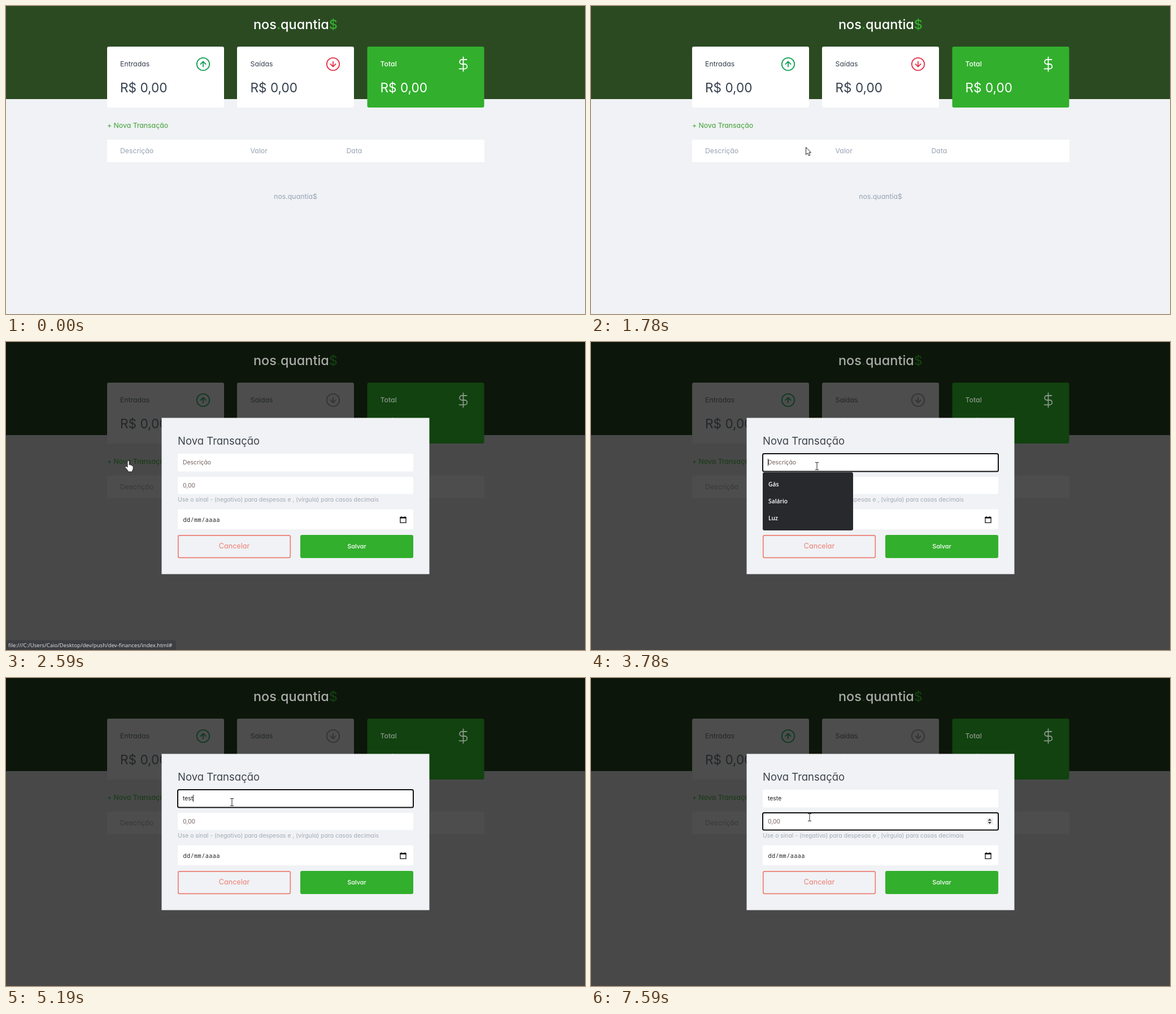
Write an HTML page that moves like this. It is 1025 px wide and 546 px high and loops after 7.99 s.

```html
<!DOCTYPE html>
<html lang="pt-BR">
<head>
<meta charset="utf-8">
<title>Nova Transação</title>
<style>
  html, body { margin: 0; width: 100%; height: 100%; overflow: hidden; background: #f0f2f5; }
  svg { display: block; width: 100%; height: 100%; }

  #stage {
    --page: #f0f2f5; --head: #2b4a22; --card: #fff; --total: #32af2d;
    --logo: #fff; --mark: #35ae2d; --ink: #36414f; --on-total: #fff;
    --in: #12a156; --out: #e5324a; --link: #3f9f33; --muted: #97a2b3;
    --bar: #505257;
  }
  #stage.hover { --link: #35b52d; }
  #stage.dim {
    --page: #484849; --head: #0d160a; --card: #4d4d4d; --total: #11420f;
    --logo: #a9aca8; --mark: #123f10; --ink: #222629; --on-total: #8b978a;
    --in: #0c3a20; --out: #343436; --link: #143b10; --muted: #36383b;
    --bar: #3d3e41;
  }

  text { font: 12.3px Inter, sans-serif; font-feature-settings: "cv11"; font-optical-sizing: none; white-space: pre; }
  .logo { font-size: 23.5px; font-weight: 500; fill: var(--logo); }
  .mark { fill: var(--mark); }
  .money { font-size: 22.6px; }
  .ink { fill: var(--ink); }
  .on-total { fill: var(--on-total); }
  .link { fill: var(--link); }
  .muted { fill: var(--muted); }
  .mid { text-anchor: middle; }
  .title { font-size: 18.5px; fill: #3d444e; }
  .field { font-size: 10.4px; fill: #75605f; }
  .typed { fill: #1d1d1f; }
  .help { font-size: 10.4px; fill: #a2abb5; }
  .date { font-family: "Noto Sans Mono", monospace; font-size: 10.3px; letter-spacing: .35px; fill: #222; }
  .cancel { font-size: 12.6px; fill: #ee7d73; }
  .save { font-size: 10.9px; font-weight: 500; fill: #fff; }
  .option { font: 600 10.3px "Open Sans", sans-serif; fill: #fff; }
  .path { font: 9.6px "Open Sans", sans-serif; fill: #e4e5e7; }
  .line { fill: none; stroke-width: 1.8; stroke-linecap: round; stroke-linejoin: round; }
  .pointer { fill: #fff; stroke: #222; stroke-linejoin: round; }
</style>
</head>
<body>
<svg id="stage" viewBox="0 0 1025 546" preserveAspectRatio="none">
  <rect width="1025" height="546" fill="var(--page)"/>
  <rect width="1025" height="165" fill="var(--head)"/>
  <text class="logo mid" x="512.5" y="41">nos<tspan class="mark">.</tspan>quantia<tspan class="mark">$</tspan></text>

  <g fill="var(--card)">
    <rect x="179" y="72" width="207" height="108" rx="3"/>
    <rect x="409" y="72" width="207" height="108" rx="3"/>
    <rect x="179" y="237" width="668" height="40"/>
  </g>
  <rect x="639.5" y="72" width="207" height="108" rx="3" fill="var(--total)"/>

  <text class="ink" x="202" y="107">Entradas</text>
  <text class="ink" x="432.5" y="107">Saídas</text>
  <text class="on-total" x="662.5" y="107" font-weight="500" style="font-weight:500">Total</text>
  <text class="ink money" x="202" y="153">R$ 0,00</text>
  <text class="ink money" x="432.5" y="153">R$ 0,00</text>
  <text class="on-total money" x="662.5" y="153">R$ 0,00</text>

  <g class="line" stroke="var(--in)" transform="translate(349 103)">
    <circle r="11.2"/><path d="M0 4.6V-4.6M-4.5 0L0-4.6L4.5 0"/>
  </g>
  <g class="line" stroke="var(--out)" transform="translate(579 103)">
    <circle r="11.2"/><path d="M0-4.6V4.6M-4.5 0L0 4.6L4.5 0"/>
  </g>
  <path class="line" stroke="var(--on-total)" transform="translate(809.5 103)"
    d="M0-12.5V12.5M6-8H-2.4A4 4 0 0 0-2.4 0H2.6A4.2 4.2 0 0 1 2.6 8.4H-7"/>

  <text class="link" x="179" y="216">+ Nova Transação</text>
  <text class="muted" x="202" y="261">Descrição</text>
  <text class="muted" x="432.5" y="261">Valor</text>
  <text class="muted" x="602.5" y="261">Data</text>
  <text class="muted mid" x="512.5" y="342">nos.quantia$</text>

  <g id="modal">
    <rect x="275.5" y="134.5" width="474" height="277" fill="#f0f2f5"/>
    <text class="title" x="304" y="182">Nova Transação</text>
    <g fill="#fff">
      <rect x="304" y="198" width="417" height="31.5" rx="2"/>
      <rect x="304" y="239" width="417" height="30.5" rx="2"/>
      <rect x="304" y="296.5" width="417" height="35.5" rx="2"/>
    </g>
    <text class="field" id="hint" x="313" y="217">Descrição</text>
    <text class="field typed" id="typed" x="313" y="217"></text>
    <text class="field" x="313" y="258">0,00</text>
    <text class="help" x="304" y="282.5">Use o sinal - (negativo) para despesas e , (vírgula) para casas decimais</text>
    <text class="date" x="313.5" y="318.5">dd/mm/aaaa</text>
    <path fill="none" stroke="#111" stroke-width="1.3" d="M698 311H708V320.3H698Z"/>
    <path stroke="#111" stroke-width="2.4" d="M697.5 311.5H708.5"/>
    <path stroke="#111" stroke-width="1.3" d="M700 309V311M706 309V311"/>

    <rect x="304.8" y="342.8" width="198.5" height="39.5" rx="2.5" fill="none" stroke="#ee7d73" stroke-width="1.7"/>
    <text class="cancel mid" x="404" y="366">Cancelar</text>
    <rect x="521" y="342" width="200" height="41" rx="3" fill="#32af2d"/>
    <text class="save mid" x="621" y="366">Salvar</text>

    <g id="spinner">
      <rect x="700" y="248" width="12" height="12" fill="#efefef"/>
      <path fill="#444" d="M702.5 253L705.8 249.2L709 253ZM702.5 255L705.8 258.8L709 255Z"/>
    </g>
    <rect id="focus" x="304" width="417" rx="2.5" fill="none" stroke="#101010" stroke-width="2"/>
    <path id="caret" stroke="#222" d="M0-10V2.5"/>

    <g id="options">
      <rect x="304" y="231" width="160" height="103" rx="3" fill="#28292d"/>
      <text class="option" x="314" y="256">Gás</text>
      <text class="option" x="314" y="286">Salário</text>
      <text class="option" x="314" y="316">Luz</text>
    </g>
  </g>

  <g id="status">
    <path d="M0 528.5H297Q301 528.5 301 532.5V546H0Z" fill="var(--bar)"/>
    <text class="path" x="4" y="541">file:///C:/Users/Caio/Desktop/dev/push/dev-finances/index.html#</text>
  </g>

  <g id="cursor">
    <path id="arrow" class="pointer" d="M.5 .5V13.5L3.5 10.8L5.6 15.4L7.8 14.4L5.8 9.9H9.6Z"/>
    <path id="hand" class="pointer" d="M-2 10V0Q-2-1.8-.4-1.8T1.2 0V6Q1.8 4.8 3 5.2T4 6.6Q5 5.6 6 6.4T6.6 7.8Q8.2 7 8.2 9.4V12Q8.2 14.5 6.7 16V18H-1V16.4L-5.8 10.6Q-7 8.6-5 8.2Q-4 8-2 10Z"/>
    <path id="beam" fill="none" stroke="#222" d="M-3-6.5H-1Q0-6.5 0-5.5Q0-6.5 1-6.5H3M0-5.5V5.5M-3 6.5H-1Q0 6.5 0 5.5Q0 6.5 1 6.5H3"/>
  </g>
</svg>

<script>
  const LOOP = 7990;
  const $ = id => document.getElementById(id);
  const show = (id, on) => $(id).style.visibility = on ? 'visible' : 'hidden';
  const held = (steps, t) => steps.findLast(([start]) => t >= start);

  // time, x, y, pointer shape
  const pointer = [
    [0, 865, -15, 'arrow'], [380, 861, 40, 'arrow'], [580, 845, 150, 'arrow'], [780, 820, 290, 'arrow'],
    [980, 804, 384, 'arrow'], [1180, 765, 378, 'arrow'], [1380, 680, 348, 'arrow'], [1580, 540, 300, 'arrow'],
    [1780, 380, 250, 'arrow'], [1980, 262, 224, 'arrow'], [2190, 217, 212, 'hand'],
    [2790, 255, 215, 'arrow'], [2990, 330, 218, 'arrow'], [3190, 385, 220, 'beam'], [3390, 400, 220, 'beam'],
    [6190, 398, 225, 'beam'], [6390, 391, 238, 'beam'], [6580, 387, 247, 'beam']
  ];
  const typing = [[0, ''], [4600, 't'], [4800, 'te'], [5000, 'tes'], [5190, 'test'], [5990, 'teste']];
  const caret = [[0, false], [3780, true], [4400, false], [4600, true], [5790, false],
    [5990, true], [6580, false], [7000, true], [7590, false]];

  function draw(t) {
    const [, x, y, shape] = held(pointer, t);
    const word = held(typing, t)[1];
    const open = t >= 2590;
    const inValue = t >= 7000;

    $('stage').setAttribute('class', open ? 'dim' : shape === 'hand' ? 'hover' : '');
    $('modal').style.display = open ? '' : 'none';
    show('status', t >= 2190 && t < 2790);
    show('options', t >= 3780 && t < 4600);
    show('hint', !word);
    show('spinner', t >= 6580);

    show('focus', t >= 3780);
    $('focus').setAttribute('y', inValue ? 239 : 198);
    $('focus').setAttribute('height', inValue ? 30.5 : 31.5);

    $('typed').textContent = word;
    const caretX = 313.5 + (inValue ? 0 : Math.round($('typed').getComputedTextLength()));
    show('caret', held(caret, t)[1]);
    $('caret').setAttribute('transform', `translate(${caretX} ${inValue ? 258 : 217})`);

    $('cursor').setAttribute('transform', `translate(${x} ${y})`);
    for (const id of ['arrow', 'hand', 'beam']) show(id, id === shape);
  }

  let start;
  function tick(now) {
    start ??= now;
    draw((now - start) % LOOP);
    requestAnimationFrame(tick);
  }
  draw(0);
  requestAnimationFrame(tick);
</script>
</body>
</html>
```
